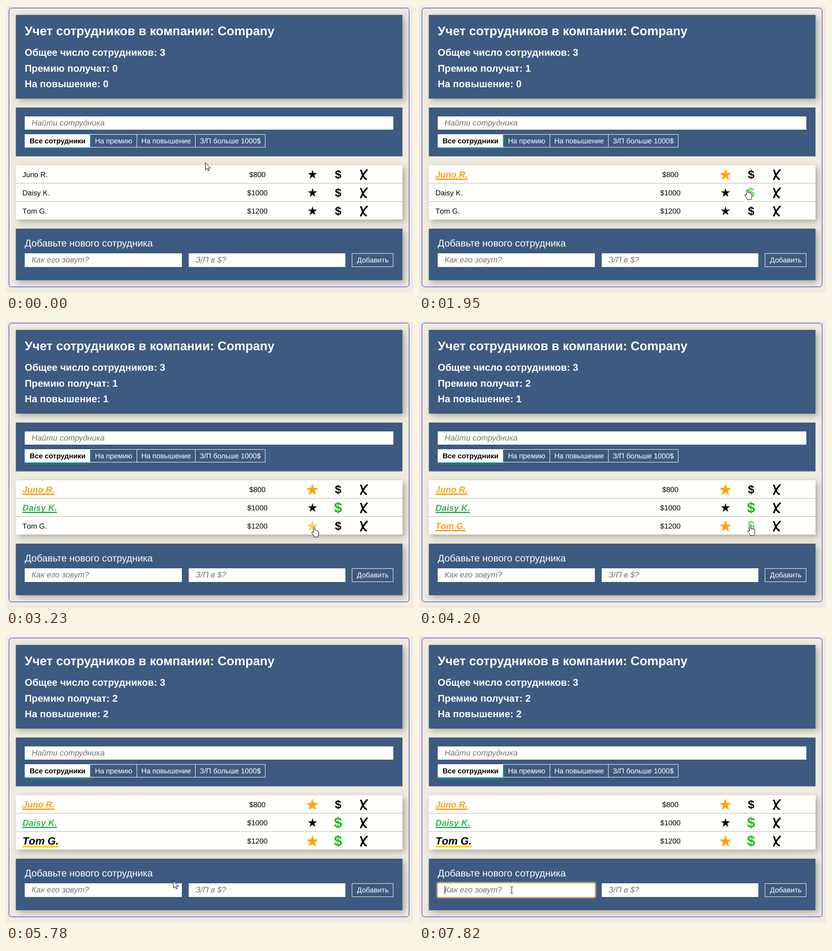
Animation, 891 px wide and 629 px high, one loop 8000 ms. Source, as an HTML page:

```html
<!DOCTYPE html>
<html lang="ru">
<head>
<meta charset="utf-8">
<title>Учет сотрудников</title>
<style>
  html, body { margin: 0; width: 100%; height: 100%; overflow: hidden; background: #f0ebde; }
  svg { display: block; width: 891px; height: 629px; font-family: Arial, "Liberation Sans", sans-serif; text-rendering: geometricPrecision; }
  text { white-space: pre; }
  .panel { fill: #3d5a80; }
  .box { fill: #fffffb; }
  .shade { filter: drop-shadow(5px 5px 7px rgba(0, 0, 0, .28)); }
  .frame { fill: none; stroke: #fff; }
  .white { fill: #fff; }
  .big { font-weight: bold; font-size: 21.4px; fill: #fff; }
  .hint { font-style: italic; font-size: 17.6px; fill: #757575; }
  .mid { font-size: 15.7px; text-anchor: middle; }
  .cash { font-weight: bold; text-anchor: middle; }
  .name { font-kerning: none; }
  .on { font-weight: bold; font-style: italic; }
  .tab { filter: drop-shadow(1px 2px 2px #0b96a0); }
  .ring { fill: none; stroke: #dda564; stroke-width: 2; filter: drop-shadow(0 0 1.5px #ffe2b8); }
</style>
</head>
<body>
<svg viewBox="0 0 891 629">
  <rect x="6.5" y="4.5" width="876" height="611" rx="6" fill="none" stroke="#2020f0"/>

  <rect class="panel shade" x="21.5" y="19.5" width="846.5" height="183.5"/>
  <text class="white" x="41" y="63.7" font-size="27.35" font-weight="bold">Учет сотрудников в компании: Company</text>
  <text class="big" x="41" y="109.3">Общее число сотрудников: 3</text>
  <text class="big" x="41" y="143.7" id="bonus"></text>
  <text class="big" x="41" y="178.4" id="raise"></text>

  <rect class="panel" x="21.5" y="222.5" width="846.5" height="107"/>
  <rect class="box" x="41" y="242" width="807" height="29"/>
  <text class="hint" x="56" y="262">Найти сотрудника</text>
  <rect class="box tab" x="41" y="281" width="143" height="29"/>
  <path class="frame" d="M184 281.5H567.5V309.5H184M286.5 281V310M414.5 281V310"/>
  <text class="mid" x="113" y="300.6" font-weight="bold" style="font-size:15.6px">Все сотрудники</text>
  <g class="white">
    <text class="mid" x="235.5" y="300.6">На премию</text>
    <text class="mid" x="350.5" y="300.6">На повышение</text>
    <text class="mid" x="491" y="300.6">З/П больше 1000$</text>
  </g>

  <rect class="box shade" x="21.5" y="349" width="846.5" height="119"/>
  <path d="M21.5 388.5H868M21.5 428.5H868" stroke="#b4b4b2"/>
  <g id="list"></g>

  <rect class="panel shade" x="21.5" y="488" width="846.5" height="113"/>
  <text class="white" x="41" y="526.7" font-size="21.25">Добавьте нового сотрудника</text>
  <rect class="box" x="41" y="542" width="344" height="30"/>
  <rect class="box" x="400" y="542" width="343" height="30"/>
  <rect class="frame" x="757.5" y="542.5" width="90" height="29"/>
  <text class="mid white" x="803" y="562">Добавить</text>
  <text class="hint" x="56" y="562">Как его зовут?</text>
  <text class="hint" x="415" y="562">З/П в $?</text>
  <rect class="ring" id="ring" x="40" y="541" width="346" height="32" rx="3"/>
  <path id="caret" d="M56.5 547V566" stroke="#000"/>
  <path id="cursor" stroke-linejoin="round"/>
</svg>
<script>
const LOOP = 8000, FOCUS = 6770;
const $ = id => document.getElementById(id);

// star / raise: moment of the click
const rows = [
  { name: "Juno R.", pay: "$800", star: 1300 },
  { name: "Daisy K.", pay: "$1000", raise: 2310 },
  { name: "Tom G.", pay: "$1200", star: 3390, raise: 4730 }
];

// pointer moves: start, end, steps, x, y
const moves = [
  [180, 970, 10, 674.5, 373],
  [1450, 1950, 7, 718.5, 402],
  [2040, 2040, 1, 721, 405],
  [2130, 2130, 1, 722.5, 405],
  [2480, 3040, 8, 677, 447],
  [3140, 3230, 2, 674.5, 451],
  [3480, 3860, 6, 722, 448],
  [4200, 4200, 1, 725, 448],
  [5180, 5780, 8, 366, 536],
  [5870, 5960, 2, 311, 556],
  [6050, 6230, 3, 235, 579],
  [6320, 6320, 1, 196, 566],
  [6410, 6410, 1, 203, 556.5],
  [6960, 6960, 1, 202, 557],
  [7120, 7120, 1, 203, 556.5]
];

const shapes = {
  arrow: "M.5 .5V16.5L4.2 13L6.6 18.3L8.9 17.3L6.6 12.1H11.5Z",
  hand: "M-1.5 12V2C-1.5 0 1.5 0 1.5 2V7.5C2 6.5 4.5 6.7 4.5 8.5C5 7.3 7.5 7.6 7.5 9.5C8 8.5 10.3 8.8 10.3 11V15C10.3 18 8.5 19 8.5 22.3H0C0 19.5-3.5 16.5-4.8 13.2C-5.8 10.8-3.2 9.8-1.5 13Z",
  beam: "M-3-7H-1L0-6L1-7H3M0-6V6.5M-3 7.5H-1L0 6.5L1 7.5H3"
};

const clamp = v => Math.min(1, Math.max(0, v));
const ease = u => u * u * (3 - 2 * u);
const rowY = i => 369 + 40 * i;

function pointer(t) {
  let x = 436, y = 343;
  for (const [start, end, n, tx, ty] of moves) {
    if (t < start) break;
    const k = Math.floor((t - start) / (end - start || 1) * (n - 1) + .01) + 1;
    const u = ease(Math.min(1, k / n));
    x += (tx - x) * u;
    y += (ty - y) * u;
  }
  return { x, y };
}

function star(cx, cy, r, color) {
  let d = "";
  for (let i = 0; i < 10; i++) {
    const a = Math.PI * i / 5, q = i % 2 ? r * .382 : r;
    d += `${i ? "L" : "M"}${cx + q * Math.sin(a)} ${cy - q * Math.cos(a)}`;
  }
  return `<path d="${d}Z" fill="${color}"/>`;
}

const cash = (cx, cy, size, color) =>
  `<text class="cash" x="${cx}" y="${cy + size * .335}" font-size="${size}" fill="${color}">$</text>`;

const cross = (cx, cy) =>
  `<path transform="translate(${cx} ${cy})" d="M-6.2-9.2C-3.8-8.5-4 5 5.6 10M7.3-10.2C2-4.5-2.5 2-6.2 10.2" fill="none" stroke="#000" stroke-width="3.5" stroke-linecap="round"/>`;

function row(r, i, t, p) {
  const y = rowY(i), starred = t >= r.star, raised = t >= r.raise;
  const grow = since => since ? clamp((t - since) / 270) : 0;
  const size = 16 * 1.2 ** (grow(r.star) + grow(r.raise));
  const tone = starred && raised ? "#000" : starred ? "#ffa01a" : raised ? "#3bb35a" : "#000";
  const base = y + size * .358;
  const over = x => Math.abs(p.x - x) < 14 && Math.abs(p.y - y) < 14;
  const line = starred || raised
    ? `<line x1="36" y1="${base + size * .19}" y2="${base + size * .19}" stroke="${starred && raised ? "#ffd400" : tone}" stroke-width="${size * .16}"/>` : "";
  return `<g>${line}<text class="name ${line && "on"}" x="36" y="${base}" font-size="${size}" fill="${tone}">${r.name}</text></g>` +
    `<text class="mid" x="550.3" y="${y + 5.7}" style="font-size:16px">${r.pay}</text>` +
    (starred ? star(670.7, y + 1.3, 14, "#ffa500") : over(671) ? star(670.7, y + 1.2, 13.2, "#f2d55f") : star(671, y + .6, 10.6, "#000")) +
    (raised ? cash(727, y, 32, "#16c01e") : over(727) ? cash(727, y, 28, "#5ce064") : cash(727, y, 25.5, "#000")) +
    cross(783, y + .5);
}

function draw(t) {
  const p = pointer(t);
  const count = key => rows.filter(r => t >= r[key]).length;
  $("bonus").textContent = "Премию получат: " + count("star");
  $("raise").textContent = "На повышение: " + count("raise");

  $("list").innerHTML = rows.map((r, i) => row(r, i, t, p)).join("");
  for (const line of $("list").querySelectorAll("line"))
    line.setAttribute("x2", 36 + line.nextSibling.getComputedTextLength());

  const onIcon = rows.some((r, i) => Math.abs(p.y - rowY(i)) < 14 &&
    [671, 727, 783].some(x => Math.abs(p.x - x) < 14));
  const inField = p.y > 542 && p.y < 572 && p.x > 41 && p.x < 743 && (p.x < 385 || p.x > 400);
  const kind = onIcon ? "hand" : inField ? "beam" : "arrow";
  const cursor = $("cursor");
  cursor.setAttribute("d", shapes[kind]);
  cursor.setAttribute("fill", kind === "beam" ? "none" : "#fff");
  cursor.setAttribute("stroke", "#000");
  cursor.setAttribute("transform", `translate(${p.x} ${p.y})`);

  const focused = t >= FOCUS;
  $("ring").style.display = focused ? "" : "none";
  $("caret").style.display = focused && (t < 7280 || t >= 7820) ? "" : "none";
}

function tick() {
  draw(performance.now() % LOOP);
  requestAnimationFrame(tick);
}
tick();
</script>
</body>
</html>
```
